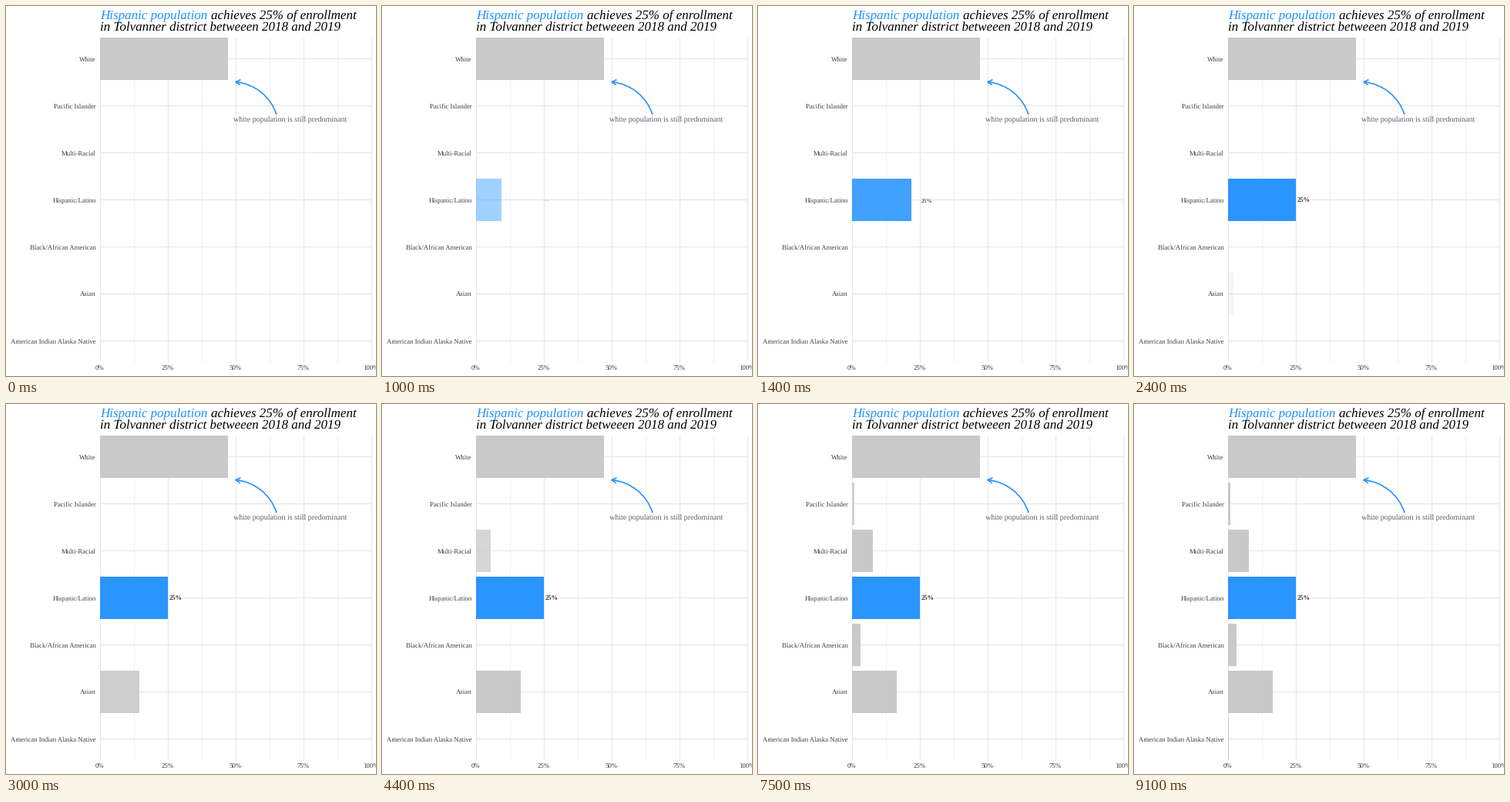
A matplotlib script that plays this animation: 480 by 480 pixels, repeating every 10 s.

```python
import matplotlib.pyplot as plt
import numpy as np
from matplotlib.animation import FuncAnimation
from matplotlib.patches import PathPatch, Rectangle
from matplotlib.path import Path

SIZE, DPI = 480, 72
FRAMES, INTERVAL = 100, 100
X0, PER_PERCENT = 122.2, 3.52
TOP, BOTTOM = 41, 462
ROW0, ROW_STEP, BAR_HEIGHT = 68.5, 61, 55
BLUE, BAR_BLUE, BAR_GREY = "#1e90ff", "#2b95ff", "#c9c9c9"
GRID, INK = "#e6e6e6", "#404040"
LABEL_SIZE = 8.54

# name, percent, frame before growth begins, frames of growth
BARS = [
    ("White", 47.1, None, 0),
    ("Pacific Islander", 0.8, 69, 7),
    ("Multi-Racial", 7.65, 39, 7),
    ("Hispanic/Latino", 25, 7, 8),
    ("Black/African American", 3.1, 54, 7),
    ("Asian", 16.45, 23, 8),
    ("American Indian Alaska Native", 0.25, 84, 7),
]

plt.rcParams.update({
    "font.family": "Liberation Serif",
    "text.hinting": "none",
    "text.kerning_factor": 0,
})
fig = plt.figure(figsize=(SIZE / DPI, SIZE / DPI), dpi=DPI, facecolor="white")
ax = fig.add_axes([0, 0, 1, 1])
ax.set(xlim=(0, SIZE), ylim=(SIZE, 0))
ax.axis("off")


def px(percent):
    return X0 + percent * PER_PERCENT


def row_y(row):
    return ROW0 + row * ROW_STEP


def write(x, y, text, size=8.8, color=INK, **style):
    return ax.text(x, y, text, fontsize=size, color=color, va="baseline", **style)


def line(xs, ys, color=GRID, width=1.07, **style):
    ax.plot(xs, ys, color=color, lw=width, solid_capstyle="butt", **style)


def draw_grid():
    for percent in np.arange(0, 101, 12.5):
        major = percent % 25 == 0
        line([px(percent)] * 2, [TOP, BOTTOM], width=1.07 if major else 0.55)
        if major:
            write(px(percent) - 0.4, 473, f"{percent:.0f}%", ha="center")
    for row, (name, *_) in enumerate(BARS):
        line([px(0), px(100)], [row_y(row)] * 2, snap=False)
        write(116.7, row_y(row) + 3.2, name, ha="right")


def draw_title():
    style = dict(size=17, style="italic")
    write(122, 17, "Hispanic population", color=BLUE, **style)
    write(265.5, 17, "achieves 25% of enrollment", color="black", **style)
    write(122, 32, "in Tolvanner district betweeen 2018 and 2019", color="black", **style)


def draw_arrow(start, tip, curvature=0.3):
    """Circular arc bending right of the chord, with an open head."""
    start, tip = np.array(start), np.array(tip)
    bend = 2 * np.arctan(curvature)
    half_chord = np.hypot(*(tip - start)) / 2
    reach = 4 / 3 * np.tan(bend / 2) * half_chord / np.sin(bend)
    heading = np.arctan2(*(tip - start)[::-1])

    def toward(angle, length):
        return length * np.array([np.cos(angle), np.sin(angle)])

    curve = Path([start, start + toward(heading + bend, reach),
                  tip - toward(heading - bend, reach), tip],
                 [Path.MOVETO] + [Path.CURVE4] * 3)
    ax.add_patch(PathPatch(curve, fill=False, ec=BLUE, lw=1.6, zorder=4))
    spread = np.radians(30)
    wings = [tip - toward(heading - bend + side * spread, 7) for side in (1, -1)]
    xs, ys = zip(wings[0], tip, wings[1])
    line(xs, ys, color=BLUE, width=1.6, zorder=4)


def draw_note():
    write(px(70), 151, "white population is still predominant",
          size=9.96, color="#5a5e63", ha="center")
    draw_arrow((351, 141), (298, 98.5))


def add_bar(row):
    color = BAR_BLUE if BARS[row][0].startswith("Hispanic") else BAR_GREY
    bar = Rectangle((X0, row_y(row) - BAR_HEIGHT / 2), 0, BAR_HEIGHT,
                    fc=color, lw=0, zorder=3)
    return ax.add_patch(bar)


def progress(frame, start, steps):
    if start is None:
        return 1.0
    return min(max((frame - start) / steps, 0.0), 1.0)


draw_grid()
draw_title()
draw_note()
bars = [add_bar(row) for row in range(len(BARS))]
label = write(px(25), row_y(3) + 3.2, "25%", size=LABEL_SIZE, weight="bold", zorder=5)


def update(frame):
    for bar, (name, percent, start, steps) in zip(bars, BARS):
        p = progress(frame, start, steps)
        bar.set_width(p * percent * PER_PERCENT)
        bar.set_alpha(p ** 0.85)
        bar.set_visible(p > 0)
        if name.startswith("Hispanic"):
            label.set_visible(p > 0)
            label.set_alpha(p)
            label.set_fontsize(max(p * LABEL_SIZE, 1))
            label.set_position((px(25) + 1.6 * p, row_y(3) + 0.5 + 2.8 * p))
    return [*bars, label]


animation = FuncAnimation(fig, update, frames=FRAMES, interval=INTERVAL,
                          repeat=True, repeat_delay=0, blit=False)
plt.show()
```
